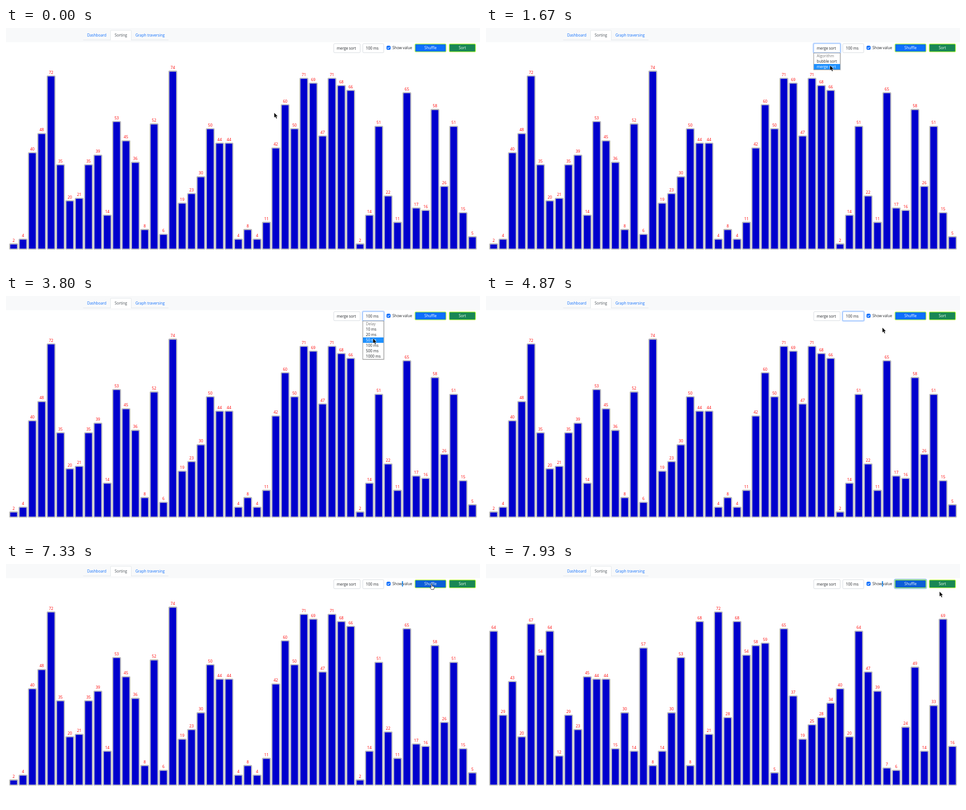
An HTML page that plays this animation: 1050x533 px, repeating every 8000 ms.

```html
<!DOCTYPE html>
<html lang="en">
<head>
<meta charset="utf-8">
<title>Sorting</title>
<style>
html, body { margin: 0; width: 100%; height: 100%; overflow: hidden; background: #fff; }
svg { display: block; width: 1050px; height: 533px; font: 8.3px "Open Sans", "Noto Sans", sans-serif; }
</style>
</head>
<body>
<svg id="stage" viewBox="0 0 1050 533"></svg>
<script>
const LOOP = 8000, STEP = 1000 / 15, FADE = 130;
const INK = '#212529', BLUE = '#0d6efd';
const stage = document.getElementById('stage');

function add(tag, attrs, parent = stage, text) {
  const el = document.createElementNS('http://www.w3.org/2000/svg', tag);
  set(el, attrs);
  if (text !== undefined) el.textContent = text;
  return parent.appendChild(el);
}
function set(el, attrs) {
  for (const k in attrs) el.setAttribute(k, attrs[k]);
}
const box = (x, y, width, height, fill, more, parent) =>
  add('rect', { x, y, width, height, fill, ...more }, parent);
const label = (x, y, text, fill = INK, more, parent) =>
  add('text', { x, y, fill, ...more }, parent, text);
const show = (el, on) => el.setAttribute('display', on ? 'inline' : 'none');
const clamp = v => Math.max(0, Math.min(1, v));
const mix = (a, b, k) => a + (b - a) * k;
const rgb = (a, b, k) => `rgb(${a.map((v, i) => Math.round(mix(v, b[i], k)))})`;
const fade = (t, on, off = Infinity) => clamp((t - on) / FADE) * (1 - clamp((t - off) / FADE));

// Navigation tabs
box(0, 0, 1050, 31.5, '#f8f9fa');
box(171, 26.2, 189, 0.9, '#dee2e6');
add('path', { d: 'M231.5 27.2V7q0-2 2-2H275.500q2 0 2 2V27.2', fill: '#fff', stroke: '#dee2e6', 'stroke-width': 0.9 });
const middle = { 'text-anchor': 'middle' };
label(201, 19, 'Dashboard', BLUE, middle);
label(254.5, 19, 'Sorting', '#495057', middle);
label(319.2, 19, 'Graph traversing', BLUE, middle);

// Bars
const before = [2, 4, 40, 48, 72, 35, 20, 21, 35, 39, 14, 53, 45, 36, 8, 52, 6, 74, 19, 23, 30, 50, 44, 44, 4,
  8, 4, 11, 42, 60, 50, 71, 69, 47, 71, 68, 66, 2, 14, 51, 22, 11, 65, 17, 16, 58, 26, 51, 15, 5];
const after = [64, 29, 43, 20, 67, 54, 64, 12, 29, 23, 45, 44, 44, 15, 30, 14, 57, 8, 14, 30, 53, 8, 68, 21, 72,
  28, 68, 54, 58, 59, 5, 65, 37, 19, 25, 28, 34, 40, 20, 64, 47, 39, 7, 6, 24, 49, 14, 33, 69, 16];

function chart(values) {
  const group = add('g', {});
  const layers = [[2.6, 'rgba(0,0,0,.1)', 3], [1.8, '#8e8e8e', 2.3], [1, '#e2e2e2', 1.5], [0, '#0000cd', 0.8]];
  const labels = add('g', { 'text-anchor': 'middle', 'font-size': 8.6 }, group);
  values.forEach((value, i) => {
    const x = 16.9 + i * 20.74, top = 491.3 - 5.33 * value;
    for (const [pad, fill, rx] of layers)
      box(x - 7.5 - pad, top - pad, 15 + 2 * pad, 490 - top + 2 * pad, fill, { rx }, group);
    label(x, top - 6, value, '#f00', {}, labels);
  });
  return { group, labels };
}
const charts = [chart(before), chart(after)];

// Form controls
function select(x, width, text) {
  const ring = box(x - 2, 32.6, width + 4, 24.4, '#0d6efd', { rx: 4, 'fill-opacity': 0.25 });
  const frame = box(x + 0.4, 34.8, width - 0.8, 20, '#fff', { rx: 2, 'stroke-width': 0.9 });
  label(x + 7.2, 48, text);
  return focus => {
    set(ring, { opacity: focus });
    set(frame, { stroke: rgb([206, 212, 218], [134, 183, 254], focus) });
  };
}
const algorithm = select(725.6, 59.4, 'merge sort');
const delay = select(790, 47.2, '100 ms');

const checkbox = box(843.3, 39.8, 8.2, 8.2, BLUE, { rx: 2, 'stroke-width': 0.8 });
add('path', { d: 'M845.2 44.1l1.5 1.500 3-3', fill: 'none', stroke: '#fff', 'stroke-width': 1.2, 'stroke-linecap': 'round', 'stroke-linejoin': 'round' });
const selection = box(877, 38, 2.5, 12, '#2b8ce6');
label(856, 47, 'Show value');

const ring = box(903.6, 32.8, 73.4, 22.6, 'rgba(49,132,253,.5)', { rx: 4 });
function button(x, width, text, fill) {
  const face = box(x + 0.7, 35.5, width - 1.4, 17.4, fill, { rx: 2, stroke: '#adff2f', 'stroke-width': 1.4 });
  label(x + width / 2, 47.2, text, '#fff', middle);
  return face;
}
const shuffle = button(905.4, 70, 'Shuffle', BLUE);
button(981.3, 59.4, 'Sort', '#198754');

function menu(x, width, rows) {
  const group = add('g', {});
  const height = rows.length * 12 + 1;
  box(x - 0.5, 56, width + 2, height + 1.200, 'rgba(0,0,0,.12)', {}, group);
  box(x + 0.4, 55.6, width - 0.8, height - 0.2, '#fff', { stroke: '#767676', 'stroke-width': 0.8 }, group);
  const mark = box(x + 0.8, 0, width - 1.6, 12, '#1e90ff', {}, group);
  const texts = rows.map((row, i) => label(x + 7.2, 65.2 + i * 12, row, INK, {}, group));
  return (open, active) => {
    show(group, open);
    set(mark, { y: 56 + active * 12 });
    texts.forEach((el, i) => set(el, { fill: i === active ? '#fff' : i ? INK : '#777' }));
  };
}
const algorithmMenu = menu(725.6, 59.4, ['Algorithm', 'bubble sort', 'merge sort']);
const delayMenu = menu(790, 47.2, ['Delay', '10 ms', '20 ms', '50 ms', '100 ms', '500 ms', '1000 ms']);

// Pointer
const arrow = add('path', {
  d: 'M0 0V11.300L2.600 8.900 4.500 13.300 6.500 12.500 4.600 8.200H8z',
  fill: '#000', stroke: '#fff', 'stroke-width': 0.5
});
const hand = add('path', {
  d: 'M-1.200 8V1.300a1.100 1.100 0 0 1 2.200 0V5l3.200.6q1.300.4 1.300 1.800V9.500L4.500 12.700H-.8L-3.500 8.900q-.5-1.200.5-1.400z',
  fill: '#fff', stroke: '#000', 'stroke-width': 0.8, 'stroke-linejoin': 'round'
});

// time, x, y; an entry with time only holds the last place
const path = [
  [0, 594, 188], [733, 750, 47], [1000], [1270, 756, 70], [1667, 762, 83], [1934], [2600, 821, 47], [2934],
  [3200, 821, 50], [3400], [3800, 813, 94], [4133, 812, 106], [4200], [4467, 881, 75], [4800], [4867, 878, 70],
  [5000, 903, 56], [5200, 876, 43], [5867], [6533, 950, 42], [6667], [6800, 933, 45], [6934], [7067, 943, 44],
  [7600], [7800, 985, 65], [7933, 1004.5, 61]
];
path.forEach((p, i) => { if (p.length === 1) p.push(...path[i - 1].slice(1)); });

function pointerAt(t) {
  const i = path.findIndex(p => p[0] > t);
  if (i < 0) return path[path.length - 1].slice(1);
  const [t0, x0, y0] = path[i - 1], [t1, x1, y1] = path[i];
  const k = (t - t0) / (t1 - t0), e = k * k * (3 - 2 * k);
  return [mix(x0, x1, e), mix(y0, y1, e)];
}
const between = (t, a, b) => t >= a && t < b;

function draw(time) {
  const t = Math.floor((time % LOOP + 3.4) / STEP) * STEP;
  const [x, y] = pointerAt(t);
  const row = Math.floor((y - 56) / 12);

  algorithm(fade(t, 933, 2930));
  delay(fade(t, 2933, 5540));
  algorithmMenu(between(t, 930, 1990), row > 0 ? row : 2);
  delayMenu(between(t, 2930, 4260), row > 0 ? row : 4);

  const checked = !between(t, 5590, 5930);
  set(checkbox, { fill: checked ? BLUE : '#fff', stroke: checked ? BLUE : '#bfbfbf' });
  show(selection, t >= 5930);

  const shuffled = t >= 7390;
  charts.forEach((c, i) => {
    show(c.group, i === +shuffled);
    show(c.labels, checked);
  });

  set(shuffle, { fill: rgb([13, 110, 253], [11, 94, 215], fade(t, 6200)) });
  set(ring, { opacity: fade(t, 7333) });

  const overButton = between(x, 906, 975) && between(y, 35, 53);
  show(hand, overButton);
  show(arrow, !overButton);
  set(overButton ? hand : arrow, { transform: `translate(${x} ${y})` });
}

const start = performance.now();
function tick() {
  draw(performance.now() - start);
  requestAnimationFrame(tick);
}
tick();
</script>
</body>
</html>
```
